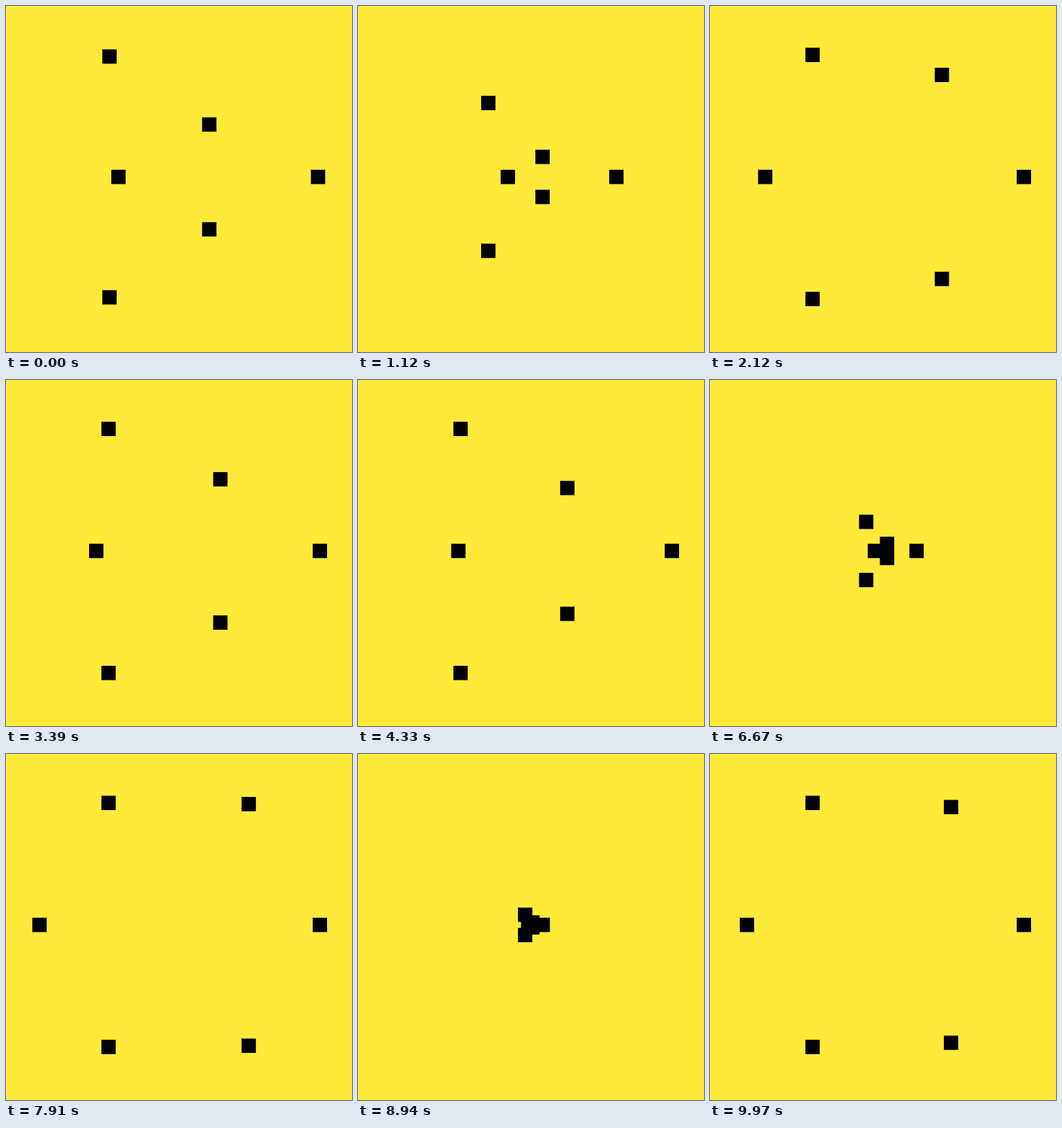
An HTML page with a canvas for the animation above (10 s loop, 500 px wide and 500 px high).

```html
<!DOCTYPE html>
<html lang="en">
<head>
<meta charset="utf-8">
<title>Six squares</title>
<style>
  html, body { margin: 0; width: 100%; height: 100%; overflow: hidden; background: #ffea3a; }
  canvas { display: block; width: 500px; height: 500px; }
</style>
</head>
<body>
<canvas id="stage" width="500" height="500"></canvas>
<script>
const ctx = document.getElementById('stage').getContext('2d');

const LOOP = 10000, CYCLE = 2000;
const INNER = 840;                  // moment in each cycle when all squares meet
const HOLD = 420, HOLD_POSE = 381;  // the loop opens on a still pose
const CX = 250, CY = 247, RADIUS = 203.6, SIZE = 20.7;

const groups = [
  { angles: [0, 120, 240], travel: 500 },   // quick, then rests on the rim
  { angles: [60, 180, 300], travel: 1000 }  // always moving
];

// cubic-bezier(.42, 0, .58, 1)
function easeInOut(x) {
  if (x >= 1) return 1;
  let lo = 0, hi = 1, s = 0.5;
  for (let i = 0; i < 24; i++) {
    s = (lo + hi) / 2;
    if (s * (1.26 - 0.78 * s + 0.52 * s * s) < x) lo = s; else hi = s;
  }
  return s * s * (3 - 2 * s);
}

function draw(ms) {
  const t = ms < HOLD ? HOLD_POSE : ms;
  const phase = (t - INNER + CYCLE) % CYCLE;
  const away = Math.min(phase, CYCLE - phase);

  ctx.fillStyle = '#ffea3a';
  ctx.fillRect(0, 0, 500, 500);
  ctx.fillStyle = '#000';
  for (const { angles, travel } of groups) {
    const r = RADIUS * easeInOut(away / travel);
    for (const deg of angles) {
      const a = deg * Math.PI / 180;
      ctx.fillRect(CX + r * Math.cos(a) - SIZE / 2, CY + r * Math.sin(a) - SIZE / 2, SIZE, SIZE);
    }
  }
}

const start = performance.now();
function tick() {
  draw((performance.now() - start) % LOOP);
  requestAnimationFrame(tick);
}
tick();
</script>
</body>
</html>
```
